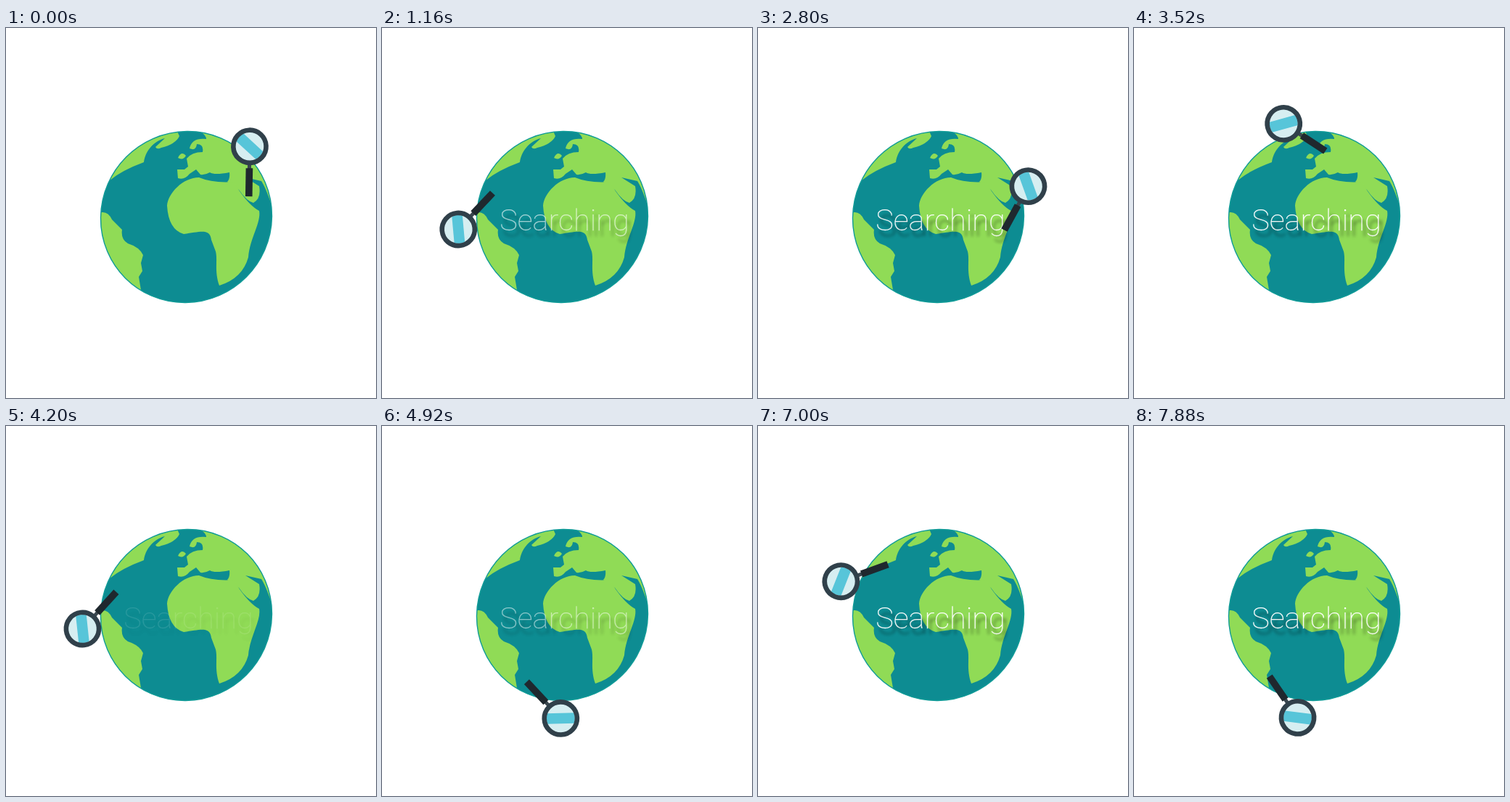
Animation of 510x510 px, one loop 7920 ms. Source, as an HTML page:

```html
<!DOCTYPE html>
<html lang="en">
<head>
<meta charset="utf-8">
<title>Searching</title>
<style>
  html, body { margin: 0; width: 100%; height: 100%; overflow: hidden; background: #fff; }
  svg { display: block; width: 100%; height: 100%; }
  #label {
    font: 100 41.5px Roboto, Inter, "Liberation Sans", sans-serif;
    fill: #fff;
    stroke: #fff;
    stroke-width: .25px;
    text-anchor: middle;
    text-shadow: 4px 8px 4px rgba(0, 0, 0, .5);
  }
</style>
</head>
<body>
<svg viewBox="0 0 510 510">
  <defs>
    <ellipse id="globe" rx="119" ry="117" transform="translate(248.5 260.5) rotate(-45)"/>
    <clipPath id="globeClip"><use href="#globe"/></clipPath>
    <clipPath id="glassClip"><circle r="19.5"/></clipPath>
  </defs>

  <use href="#globe" fill="#0d8c92"/>
  <g fill="#90db56" clip-path="url(#globeClip)">
    <!-- North America and Greenland -->
    <path d="M138 215L143 210Q160 196 190 185C192 170 203 156 219 152L206 164Q208 168 214 165Q234 160 239 149L235 140H150Z"/>
    <!-- South America -->
    <path d="M122 262L132 254Q141 253 146 264L160 278Q158 291 168 297Q184 302 189 313L186 324L188 335L183 343L186 361L160 365L122 300Z"/>
    <!-- Britain -->
    <path d="M237 179Q242 169 248 176Q244 183 237 179Z"/>
    <!-- Europe and Asia -->
    <path d="M268 143Q276 148 276 153Q256 151 253 166Q262 170 263 160Q273 160 271 171Q256 171 249 180L251 191L246 195H236L237 207Q246 210 253 201L262 195L268 202Q274 203 281 199Q287 203 308 199Q309 208 305 212L321 223Q332 239 341 241Q352 235 349 218L330 206L352 211Q358 220 366 244L375 230L340 140Z"/>
    <!-- Africa -->
    <path d="M222 245C223 228 244 206 266 206Q285 214 314 212L322 225Q337 246 349 252C352 268 336 290 334 316Q326 345 294 355C287 335 292 320 289 308L283 292C281 276 268 281 245 284Q224 278 222 245Z"/>
  </g>
  <use href="#globe" fill="none" stroke="#109c98" stroke-width="1.4"/>

  <text id="label" x="251.5" y="279">Searching</text>

  <g id="orbit">
    <g transform="translate(138 0)">
      <g transform="rotate(138.5)">
        <rect x="24" y="-2.5" width="8" height="5" fill="#3a464e"/>
        <rect x="30" y="-4.8" width="38.8" height="9.6" fill="#1f282e"/>
      </g>
      <circle r="20" fill="#d6eef1"/>
      <rect x="-7.3" y="-20" width="14.6" height="40" fill="#57c5d9" clip-path="url(#glassClip)"/>
      <circle r="22.6" fill="none" stroke="#30404a" stroke-width="6.6"/>
    </g>
  </g>
</svg>
<script>
const LOOP = 7920, STEP = 40, FADE = 4040;
const CENTER = "242.7 265";
const START_ANGLE = -47.5, DEGREES_PER_MS = -0.1187;

const orbit = document.querySelector("#orbit");
const label = document.querySelector("#label");
const easeOut = x => 1 - (1 - x) ** 3;

function draw(t) {
  const angle = START_ANGLE + DEGREES_PER_MS * t;
  orbit.setAttribute("transform", `translate(${CENTER}) rotate(${angle})`);
  label.setAttribute("opacity", easeOut(t % FADE / FADE));
}

const start = performance.now();
function tick() {
  const t = (performance.now() - start) % LOOP;
  draw(Math.floor(t / STEP) * STEP);
  requestAnimationFrame(tick);
}
draw(0);
requestAnimationFrame(tick);
</script>
</body>
</html>
```
